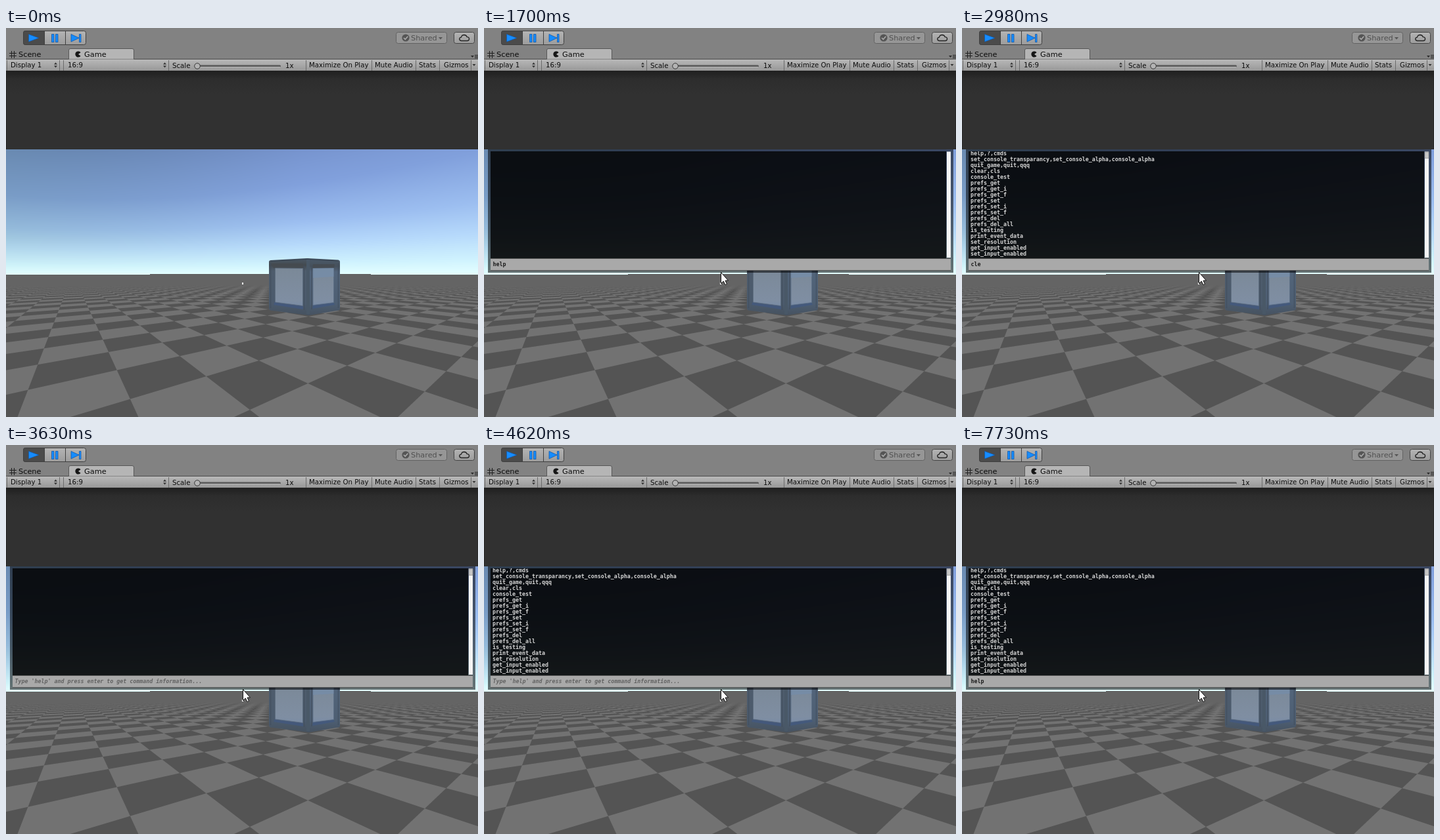
Recreate the animation shown at these times as an HTML page with a canvas. Size 718 px wide and 593 px high, loop 8 s.

```html
<!DOCTYPE html>
<html lang="en">
<head>
<meta charset="utf-8">
<title>Command console</title>
<style>
  html, body { margin: 0; width: 718px; height: 593px; overflow: hidden; background: #313131; }
  canvas, svg { position: absolute; left: 0; top: 0; display: block; }
  text { font-family: "DejaVu Sans", sans-serif; fill: #0c0c0c; white-space: pre; }
  .tab { font-size: 11.3px; }
  .bar text { font-size: 10.2px; }
  .mono text { font: bold 8.3px "DejaVu Sans Mono", monospace; }
  #log text { fill: #d6d6d6; }
  .mono #input { fill: #1c1c1c; }
  .mono #input.hint { fill: #626262; font-style: italic; }
</style>
</head>
<body>
<canvas id="world" width="718" height="593"></canvas>
<svg width="718" height="593" viewBox="0 0 718 593">
  <defs>
    <linearGradient id="strip" x2="0" y2="1">
      <stop stop-color="#b8b8b8"/><stop offset="1" stop-color="#989898"/>
    </linearGradient>
    <linearGradient id="button" x2="0" y2="1">
      <stop stop-color="#b4b4b4"/><stop offset="1" stop-color="#9c9c9c"/>
    </linearGradient>
    <linearGradient id="shade" x2="0" y2="1">
      <stop stop-color="#202020"/><stop offset=".1" stop-color="#2d2d2d"/><stop offset=".3" stop-color="#313131"/>
    </linearGradient>
    <linearGradient id="left" x2="0" y2="1">
      <stop stop-color="#4b5967"/><stop offset=".12" stop-color="#434a50"/><stop offset=".22" stop-color="#4e5c6c"/>
      <stop offset=".8" stop-color="#4b5a6c"/><stop offset="1" stop-color="#46525f"/>
    </linearGradient>
    <linearGradient id="right" x2="0" y2="1">
      <stop stop-color="#4a5969"/><stop offset=".14" stop-color="#46515c"/><stop offset=".24" stop-color="#52647a"/>
      <stop offset=".8" stop-color="#4d5e72"/><stop offset="1" stop-color="#465260"/>
    </linearGradient>
    <linearGradient id="pane" x2="0" y2="1">
      <stop stop-color="#7b8998"/><stop offset=".85" stop-color="#7f8ea2"/><stop offset="1" stop-color="#7a8ca6"/>
    </linearGradient>
    <clipPath id="logClip"><rect x="10" y="188" width="693" height="163"/></clipPath>
  </defs>

  <!-- editor chrome -->
  <rect width="718" height="48" fill="#828282"/>
  <g stroke="#3f3f3f">
    <rect x="26.5" y="4.5" width="95" height="21" rx="3" fill="url(#button)"/>
    <path d="M29.5 4.5H58.5V25.5H29.5Q26.5 25.5 26.5 22.5V7.5Q26.5 4.5 29.5 4.5Z" fill="#4b4b4b"/>
    <path d="M90.5 5V25"/>
  </g>
  <g fill="#168cff" stroke="#1458a8" stroke-width=".8">
    <path d="M34.5 9.5L50 15.2L34.5 21Z"/>
    <path d="M69.5 9.5h3.5v12h-3.5zM75.5 9.5h3.5v12h-3.5z"/>
    <path d="M99 9.5L111 15.2L99 21ZM111.5 9.5h2.5v12h-2.5z"/>
  </g>
  <rect x="593.5" y="6.5" width="77" height="17" rx="3" fill="#969696" stroke="#626262"/>
  <circle cx="608" cy="15" r="5.6" fill="#555"/>
  <path d="M605 15L607.3 17.3L611.3 12.7" fill="none" stroke="#ababab" stroke-width="1.6"/>
  <text class="tab" x="616" y="19" style="fill:#505050">Shared</text>
  <path d="M658 14h6l-3 3.5z" fill="#555"/>
  <rect x="681.5" y="6.5" width="31" height="17" rx="3" fill="url(#button)" stroke="#454545"/>
  <path d="M692.5 19.5Q689.5 19 689.8 16.3Q690.2 14.2 692.5 14.2Q693.2 10.5 697 10.5Q700.3 10.6 701.2 13.7Q704.5 13.7 704.6 16.6Q704.4 19.3 701.7 19.5Z" fill="none" stroke="#242424" stroke-width="1.3"/>

  <path d="M95.5 48V34Q95.5 31.5 98 31.5H192Q194.5 31.5 194.5 34V48Z" fill="#b5b5b5" stroke="#575757"/>
  <path d="M8.5 35V46M12.5 35V46M5 38.5H16M5 42.5H16" stroke="#222" stroke-width="1.1"/>
  <text class="tab" x="19" y="44">Scene</text>
  <path d="M110 40L113.6 37.2A4.6 4.6 0 1 0 113.6 42.8Z" fill="#161616"/>
  <text class="tab" x="119" y="44">Game</text>
  <path d="M707 42h5l-2.5 3zM713 41h5v1h-5zM713 43h5v1h-5zM713 45h5v1h-5z" fill="#2c2c2c"/>

  <rect y="48" width="718" height="17" fill="url(#strip)"/>
  <path d="M0 47.5H95M195 47.5H718" stroke="#4c4c4c"/>
  <path d="M0 65.5H718" stroke="#262626"/>
  <path d="M1.5 49V65M81.5 49V65M87.5 49V65M247.5 49V65M456.5 49V65M556.5 49V65M623.5 49V65M659.5 49V65M707.5 49V65" stroke="#6b6b6b"/>
  <g class="bar">
    <text x="7" y="60">Display 1</text>
    <text x="94" y="60">16:9</text>
    <text x="253" y="61">Scale</text>
    <text x="425" y="61">1x</text>
    <text x="461" y="60">Maximize On Play</text>
    <text x="561" y="60">Mute Audio</text>
    <text x="628" y="60">Stats</text>
    <text x="666" y="60">Gizmos</text>
  </g>
  <path d="M73 55.5h5l-2.5-3zM73 57.5h5l-2.5 3zM239 55.5h5l-2.5-3zM239 57.5h5l-2.5 3zM709.5 55h5l-2.5 3z" fill="#333"/>
  <rect x="290" y="56.5" width="128" height="3" rx="1.5" fill="#595959"/>
  <path d="M291 59.5H417" stroke="#c4c4c4" stroke-width=".8"/>
  <circle cx="291" cy="58" r="4.3" fill="#b4b4b4" stroke="#373737"/>
  <rect y="66" width="718" height="119" fill="url(#shade)"/>
  <path d="M.5 66V185M717.5 66V185" stroke="#272727"/>

  <!-- crate -->
  <path d="M400 356Q400 354.3 402.5 354L457 351L460 351V438L457 437.5L402 430.5Q400 430 400 427Z" fill="url(#left)"/>
  <path d="M459 351L505.5 353.5Q508 354 508 356V428Q508 430 505 430.5L461 438L459 438Z" fill="url(#right)"/>
  <path d="M403 355.5L459 352.5L505 355" fill="none" stroke="#3b4855" stroke-width="1.6"/>
  <path d="M403 359H451L453 366H407ZM467 360H500L499 366H466Z" fill="#454a4f" opacity=".8"/>
  <path d="M409 417.5L452 423.5V429L407 422ZM467 422L498 418L500 422L466 428Z" fill="#425980" opacity=".75"/>
  <path d="M409.5 366L451.5 366.5V423.5L409.5 418Z" fill="url(#pane)" stroke="#5e6d7e" stroke-width=".8"/>
  <path d="M467 366.5L498.5 366V418.5L467 422.5Z" fill="url(#pane)" stroke="#5e7087" stroke-width=".8"/>
  <path d="M467 366.5L498.5 366V379L467 381Z" fill="#738dac" opacity=".65"/>
  <path d="M453.5 362V430M465 362V429M402.5 358V427M505.5 358V427" stroke="#414d5c" stroke-width="1.6" opacity=".65"/>
  <path d="M459.5 353V436" stroke="#495867" stroke-width="5"/>
  <rect x="359" y="388" width="2" height="3" fill="#fff"/>

  <!-- console -->
  <g id="console" class="mono">
    <rect x="6" y="185" width="708" height="188" fill="#000" fill-opacity=".55"/>
    <rect x="10" y="188" width="693" height="163" fill="#000" fill-opacity=".78"/>
    <g id="log" clip-path="url(#logClip)"></g>
    <rect x="704" y="188.5" width="6" height="161.5" fill="#f4f4f4"/>
    <path id="track" d="M704 189h6v9.5h-6z" fill="#c6c6c6" stroke="#8f8f8f" stroke-width=".7"/>
    <rect x="10" y="352" width="700" height="17" fill="#a9a9a9"/>
    <path d="M10 351.5H710M10 369.5H710" stroke="#555"/>
    <text id="input" x="13.5" y="363"></text>
    <path d="M360.5 372.5V389.5L364.3 386L367 391.5L369.5 390.4L367 385H371.5Z" fill="#fff" stroke="#111"/>
  </g>
</svg>
<script>
const $ = id => document.getElementById(id);
const W = 718, H = 593, SKY_TOP = 185, HORIZON = 375;
const clamp = x => Math.max(0, Math.min(1, x));
const mix = (a, b, t) => a + (b - a) * t;

// Sky colours by relative height above the horizon
const SKY = [
  [0, [228, 255, 255]], [.07, [208, 243, 254]], [.2, [182, 217, 251]],
  [.35, [156, 190, 240]], [.6, [129, 160, 220]], [1, [111, 139, 196]]
];
const LEFT_TINT = [-8, -4, -22];

function skyColor(x, y) {
  const height = Math.max(0, HORIZON - y) / Math.hypot(440, x - 150) / .432;
  let i = 1;
  while (i < SKY.length - 1 && height > SKY[i][0]) i++;
  const [h0, c0] = SKY[i - 1], [h1, c1] = SKY[i];
  const t = clamp((height - h0) / (h1 - h0));
  const tint = clamp(1 - x / 450) * clamp(height / .28);
  return c0.map((c, k) => mix(c, c1[k], t) + tint * LEFT_TINT[k]);
}

// Checkerboard in two-point perspective: near corner, vanishing points, tile steps
const NEAR = { x: 371, y: 582 }, LEFT = 101.5, RIGHT = 825.5;
const STEP_U = .2412, STEP_V = .327;

function isDark(x, y) {
  const depth = (y - HORIZON) / (NEAR.y - HORIZON);
  const a = (x - LEFT - (NEAR.x - LEFT) * depth) / (RIGHT - LEFT);
  const b = 1 - depth - a;
  const u = Math.floor(a / (STEP_U * depth));
  const v = Math.floor(b / (STEP_V * depth));
  return (u + v) % 2 === 0;
}

function floorColor(x, y) {
  const N = 5;
  let dark = 0;
  for (let i = 0; i < N; i++)
    for (let j = 0; j < N; j++)
      dark += isDark(x + (i + .5) / N, y + (j + .5) / N);
  const tone = mix(114, 84, dark / (N * N));
  const g = mix(100, tone, clamp((y - 391) / 10));
  return [g, g, g];
}

function drawWorld() {
  const ctx = $("world").getContext("2d");
  const img = ctx.createImageData(W, H - SKY_TOP);
  for (let y = SKY_TOP, p = 0; y < H; y++)
    for (let x = 0; x < W; x++, p += 4)
      img.data.set([...(y <= HORIZON ? skyColor : floorColor)(x, y), 255], p);
  ctx.putImageData(img, 0, SKY_TOP);
  ctx.fillStyle = "#5c5c5c";
  ctx.fillRect(219, HORIZON, 336, 1);
}

const COMMANDS = `help,?,cmds
set_console_transparancy,set_console_alpha,console_alpha
quit_game,quit,qqq
clear,cls
console_test
prefs_get
prefs_get_i
prefs_get_f
prefs_set
prefs_set_i
prefs_set_f
prefs_del
prefs_del_all
is_testing
print_event_data
set_resolution
get_input_enabled
set_input_enabled`.split("\n");
const HINT = "Type 'help' and press enter to get command information...";

COMMANDS.forEach((line, i) => {
  const text = document.createElementNS("http://www.w3.org/2000/svg", "text");
  text.setAttribute("x", 13);
  text.setAttribute("y", 194 + i * 9);
  text.textContent = line;
  $("log").append(text);
});

const type = (word, times) => times.map((t, i) => [t, { input: word.slice(0, i + 1) }]);
const EVENTS = [
  [0, { open: false, log: false, scrolled: false, input: "" }],
  [500, { open: true }],
  ...type("help", [1430, 1520, 1670, 1700]),
  [1910, { input: "", log: true }],
  [1970, { scrolled: true }],
  ...type("clear", [2750, 2840, 2930, 3010, 3080]),
  [3630, { input: "", log: false }],
  [3660, { scrolled: false }],
  ...type("?", [4100]),
  [4560, { input: "" }],
  [4590, { log: true }],
  [4620, { scrolled: true }],
  ...type("help", [7400, 7520, 7670, 7730])
];
const LOOP = 8000;

const show = (id, on) => { $(id).style.display = on ? "" : "none"; };

function frame() {
  const now = performance.now() % LOOP;
  const state = {};
  for (const [t, change] of EVENTS) if (t <= now) Object.assign(state, change);
  show("console", state.open);
  show("log", state.log);
  show("track", state.scrolled);
  $("input").textContent = state.input || HINT;
  $("input").classList.toggle("hint", !state.input);
  requestAnimationFrame(frame);
}

drawWorld();
frame();
</script>
</body>
</html>
```
